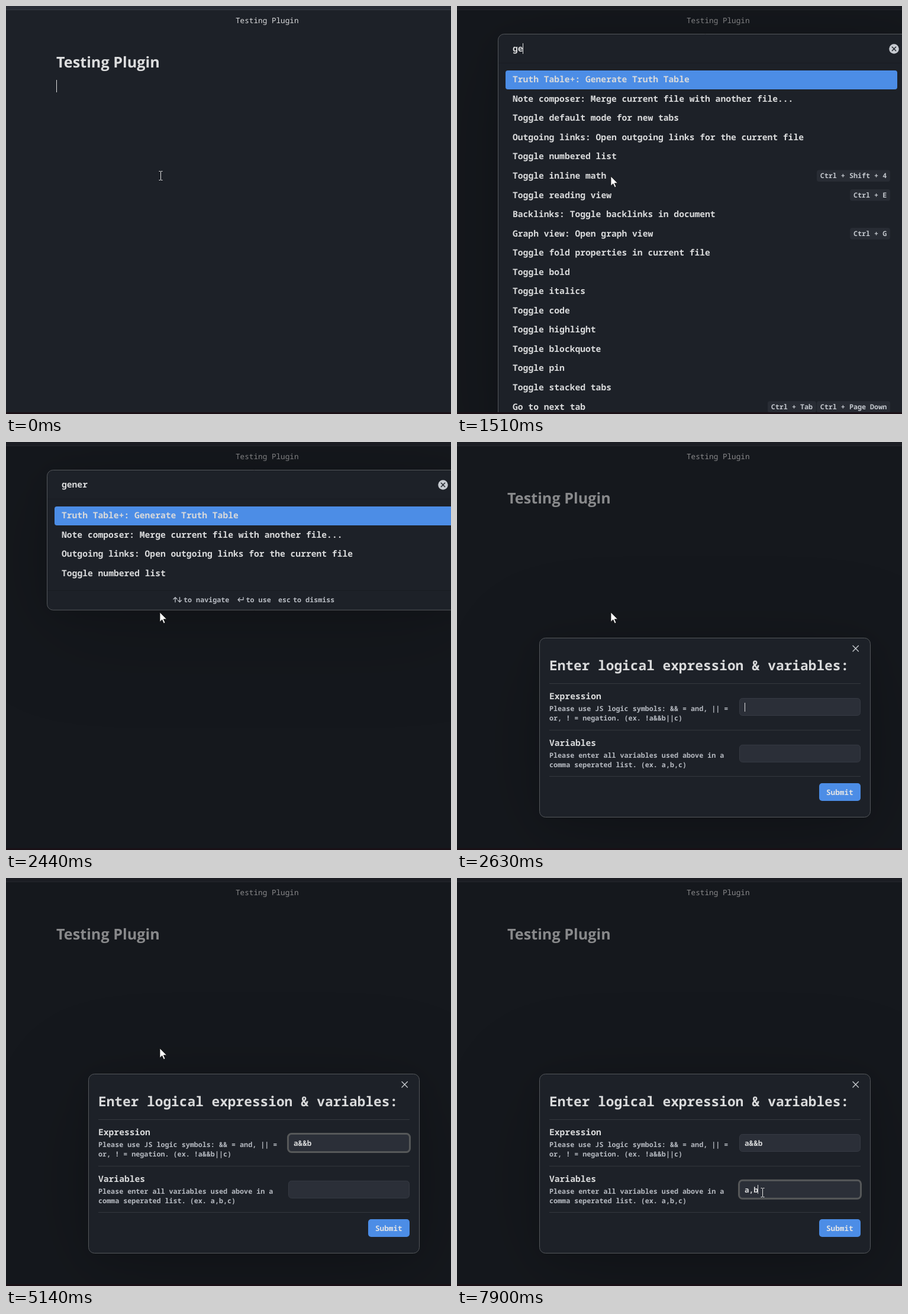
Animation of 752 by 690 pixels, one loop 8 s. Source, as an HTML page:

```html
<!DOCTYPE html>
<html lang="en">
<head>
<meta charset="utf-8">
<title>Testing Plugin</title>
<style>
  html, body { margin: 0; width: 100%; height: 100%; overflow: hidden; background: #1d2128; }
  svg { display: block; width: 752px; height: 690px; }
  text { font-family: "Noto Sans Mono", "DejaVu Sans Mono", monospace; text-rendering: geometricPrecision; white-space: pre; }
  .heading { font-family: "Open Sans", "Noto Sans", sans-serif; }
  .panel { fill: #1d2128; stroke: #54575b;
    filter: drop-shadow(0 6px 24px rgba(0,0,0,.11)) drop-shadow(0 30px 80px rgba(0,0,0,.2)); }
  .field { fill: #2b2f38; stroke: #363a43; }
  .ring { fill: none; stroke: #565859; stroke-width: 3; }
  .line { fill: none; stroke-width: 1.4; stroke-linecap: round; stroke-linejoin: round; }
</style>
</head>
<body>
<svg id="stage" viewBox="0 0 752 690"></svg>
<script>
const LOOP = 8000, ROW = 32.55;
const TEXT = '#d9dadb', MUTED = '#b6bac1', BLUE = '#4c8de6';
// font sizes and their character advances
const SIZE = { s: 11.72, m: 12.7, l: 14.65, xl: 22.8 };
const advance = size => size * 0.6;

const base = [
  'Save current file|Ctrl + S', 'Toggle pin', 'Split right', 'Split down',
  'Toggle stacked tabs', 'Rename file|F2', 'Copy file path', 'Copy Marbelow URL',
  'Undo close tab|Ctrl + Shift + T', 'Export to PDF...|Ctrl + Shift + Enter',
  'Open current tab in new window', 'Move current tab to new window',
  'Go to next tab|Ctrl + Page Down|Ctrl + Tab', 'Go to tab #1|Ctrl + 1',
  'Go to last tab|Ctrl + 9', 'Go to previous tab|Ctrl + Page Up|Ctrl + Shift + Tab',
  'New tab|Ctrl + T', 'Calendar: Open Weekly Note'
];
const ranked = [
  'Truth Table+: Generate Truth Table',
  'Note composer: Merge current file with another file...',
  'Toggle default mode for new tabs',
  'Outgoing links: Open outgoing links for the current file',
  'Toggle numbered list', 'Toggle inline math|Ctrl + Shift + 4',
  'Toggle reading view|Ctrl + E', 'Backlinks: Toggle backlinks in document',
  'Graph view: Open graph view|Ctrl + G', 'Toggle fold properties in current file',
  'Toggle bold', 'Toggle italics', 'Toggle code', 'Toggle highlight', 'Toggle blockquote'
];

const esc = s => s.replace(/&/g, '&amp;').replace(/</g, '&lt;');
const raw = (x, y, body, size, fill = TEXT, weight = 600, extra = '') =>
  `<text x="${x}" y="${y}" font-size="${size}" fill="${fill}" font-weight="${weight}" ${extra}>${body}</text>`;
const text = (x, y, s, ...rest) => raw(x, y, esc(s), ...rest);
const rect = (x, y, w, h, attrs) => `<rect x="${x}" y="${y}" width="${w}" height="${h}" ${attrs}/>`;
const path = (d, stroke) => `<path class="line" d="${d}" stroke="${stroke}"/>`;
const group = (id, body) => `<g id="${id}">${body}</g>`;

// positions of the query letters, taken in order; null if one is missing
function match(name, query) {
  const hits = [];
  let from = 0;
  for (const c of query) {
    const i = name.toLowerCase().indexOf(c, from);
    if (i < 0) return null;
    hits.push(i);
    from = i + 1;
  }
  return hits;
}

function commandRow(item, i, query, right) {
  const [name, ...keys] = item.split('|');
  const hits = match(name, query);
  const mid = 124.5 + ROW * i;
  const label = [...name].map((c, k) =>
    hits.includes(k) ? `<tspan font-weight="800">${c}</tspan>` : esc(c)).join('');
  let out = raw(94, mid + 4.7, label, SIZE.l);
  for (const key of keys) {
    const w = key.length * advance(SIZE.s) + 11.6;
    out += rect(right - w, mid - 9.7, w, 19.5, `rx="4" fill="${i ? '#282c34' : '#22262e'}"`)
      + text(right - w + 5.8, mid + 3.8, key, SIZE.s, '#c3c7cd');
    right -= w + 1;
  }
  return out;
}

function palette(query) {
  const pool = query ? ranked.concat(base) : base;
  const rows = pool.filter(item => match(item.split('|')[0], query)).slice(0, 18);
  const long = rows.length > 16;
  const bottom = long ? 740 : 479 - (10 - rows.length) * ROW;
  let out = rect(69.5, 47.5, 700, bottom - 47, 'rx="10" class="panel"')
    + rect(70, 96, 699, 1, 'fill="#191c22"')
    + text(94, 77, query || 'Select a command...', SIZE.l, query ? TEXT : '#696d74', query ? 600 : 500)
    + '<circle cx="738.5" cy="72.5" r="8.3" fill="#c6cad0"/>'
    + path('M735.3 69.3l6.4 6.4m0-6.4l-6.4 6.4', '#1d2128')
    + rect(82, 109, long ? 662 : 674, 32, `rx="4" fill="${BLUE}"`)
    + rows.map((item, i) => commandRow(item, i, query, long ? 732 : 744)).join('');
  if (!long) {
    const y = bottom - 13;
    out += rect(70, bottom - 33, 699, 1, 'fill="#191c22"')
      + path(`M286 ${y}v-8m-3 3l3-3 3 3M293.5 ${y - 8}v8m-3-3l3 3 3-3M401 ${y - 8}v4h-9m3-3l-3 3 3 3`, MUTED)
      + text(300, y, 'to navigate', SIZE.s, MUTED) + text(405.5, y, 'to use', SIZE.s, MUTED)
      + text(460, y, 'esc', SIZE.s, MUTED, 800) + text(485, y, 'to dismiss', SIZE.s, MUTED);
  }
  return out;
}

function setting(y, name, lines, id) {
  return rect(156, y, 526, 1, 'fill="#34383e"')
    + text(156, y + 26.7, name, SIZE.l)
    + lines.map((s, i) => text(156, y + 47 + 16 * i, s, SIZE.s, MUTED)).join('')
    + rect(477.5, y + 25.5, 204, 29, 'rx="5" class="field"')
    + rect(476.5, y + 24.5, 206, 31, `rx="6" class="ring" id="${id}Ring"`)
    + text(486, y + 45, '', SIZE.m, TEXT, 600, `id="${id}Text"`);
}

const dialog = rect(139.5, 331.5, 559, 303, 'rx="10" class="panel"')
  + path('M669 344.5l9.4 9.4m0-9.4l-9.4 9.4', '#c3c7cb')
  + text(156, 386, 'Enter logical expression & variables:', SIZE.xl, TEXT, 700)
  + setting(408, 'Expression',
    ['Please use JS logic symbols: && = and, || =', 'or, ! = negation. (ex. !a&&b||c)'], 'expr')
  + setting(486.8, 'Variables',
    ['Please enter all variables used above in a', 'comma seperated list. (ex. a,b,c)'], 'vars')
  + rect(156, 565, 526, 1, 'fill="#34383e"')
  + rect(612, 577, 70, 30, `rx="5" fill="${BLUE}"`)
  + text(624, 597, 'Submit', SIZE.m, '#e2e4e6', 700);

// step tables: [time, value]
const queries = [[0, null], [910, ''], [1380, 'g'], [1510, 'ge'], [1710, 'gen'], [1780, 'gene'], [1910, 'gener'], [2630, null]];
const exprs = [[0, ''], [3220, 'a'], [3750, 'a&'], [3880, 'a&&'], [4610, 'a&&b']];
const vars = [[0, ''], [6510, 'a'], [7440, 'a,'], [7900, 'a,b']];
const carets = [[0, 1], [380, 0], [910, 1], [2440, 0], [2630, 1], [4480, 0], [4610, 1], [5140, 0], [5690, 1], [7040, 0], [7440, 1]];
const covers = [[0, 0], [910, .5], [980, 1]];
const exprRings = [[0, 0], [2700, .5], [2770, 1], [6110, 0]];
const varsRings = [[0, 0], [6110, .5], [6180, 1]];
const at = (steps, t) => steps.findLast(s => s[0] <= t)[1];

// pointer route: [time, x, y]
const route = [[5270, 260, 287], [5480, 300, 330], [5690, 420, 470], [5830, 495, 560], [5900, 512, 563], [6040, 517, 540], [6110, 516, 532]];
function pointer(t) {
  const q = Math.min(6110, 5340 + Math.floor((t - 5340) / 70) * 70);
  if (q < 5340) return [260, 287];
  const k = route.findIndex(p => p[0] >= q);
  const [a, b] = [route[k - 1], route[k]];
  const f = (q - a[0]) / (b[0] - a[0]);
  return [1, 2].map(i => Math.round(a[i] + (b[i] - a[i]) * f));
}

document.getElementById('stage').innerHTML =
  rect(0, 0, 752, 690, 'fill="#1d2128"') + rect(0, 0, 752, 6, 'fill="#282c34"') + rect(0, 6, 752, 1, 'fill="#363a42"')
  + text(388, 28.7, 'Testing Plugin', SIZE.m, '#dcddde', 500)
  + text(85, 104, 'Testing Plugin', 25.2, '#dcddde', 700, 'class="heading"')
  + rect(0, 0, 752, 690, 'id="cover" fill="rgb(10,12,14)"')
  + queries.filter(q => q[1] !== null).map(q => group('list' + q[1].length, palette(q[1]))).join('')
  + group('dialog', dialog)
  + rect(0, 0, 1, 18, 'id="caret" fill="#dcddde"')
  + rect(0, 687, 752, 3, 'fill="#1a1016"')
  + group('beam', '<path d="M-2.5-7.5h2.5m1 0h2.5M.5-7v14M-2.5 7.5h2.5m1 0h2.5" stroke="#e4e4e4" fill="none"/>')
  + group('arrow', '<path d="M0 0v16.2l3.8-3.6 2.7 6.1 2.5-1.1-2.7-5.9h5.2z" fill="#fff" stroke="#111" stroke-width=".8"/>');

const $ = Object.fromEntries([...document.querySelectorAll('[id]')].map(el => [el.id, el]));
const show = (el, on) => { el.style.display = on ? '' : 'none'; };
const set = (el, attrs) => { for (const k in attrs) el.setAttribute(k, attrs[k]); };

function caretBox(t, query, expr, list) {
  if (t < 910) return [85, 125, 21];
  if (query !== null) return [94 + query.length * advance(SIZE.l), 63, 18];
  if (t < 6110) return [486 + expr.length * advance(SIZE.m), 441, 15];
  return [486 + list.length * advance(SIZE.m), 519, 15];
}

function draw(t) {
  const query = at(queries, t), expr = at(exprs, t), list = at(vars, t), cover = at(covers, t);
  $.cover.setAttribute('opacity', cover * .4);
  for (let n = 0; n <= 5; n++) {
    show($['list' + n], query !== null && query.length === n);
    $['list' + n].setAttribute('opacity', cover);
  }
  show($.dialog, t >= 2630);
  $.exprText.textContent = expr;
  $.varsText.textContent = list;
  $.exprRing.setAttribute('opacity', at(exprRings, t));
  $.varsRing.setAttribute('opacity', at(varsRings, t));

  const [cx, cy, ch] = caretBox(t, query, expr, list);
  set($.caret, { x: Math.floor(cx), y: cy, height: ch });
  show($.caret, at(carets, t));

  const [x, y] = pointer(t);
  const overField = t >= 5340 && x > 477 && x < 682 && (Math.abs(y - 448) < 15 || Math.abs(y - 526) < 15);
  const beam = t < 910 || overField;
  show($.beam, beam);
  show($.arrow, !beam);
  set($.beam, { transform: `translate(${t < 910 ? 261 : x} ${y})` });
  set($.arrow, { transform: `translate(${x} ${y + 1})` });
}

const start = performance.now();
function tick() {
  draw((performance.now() - start) % LOOP);
  requestAnimationFrame(tick);
}
tick();
</script>
</body>
</html>
```
